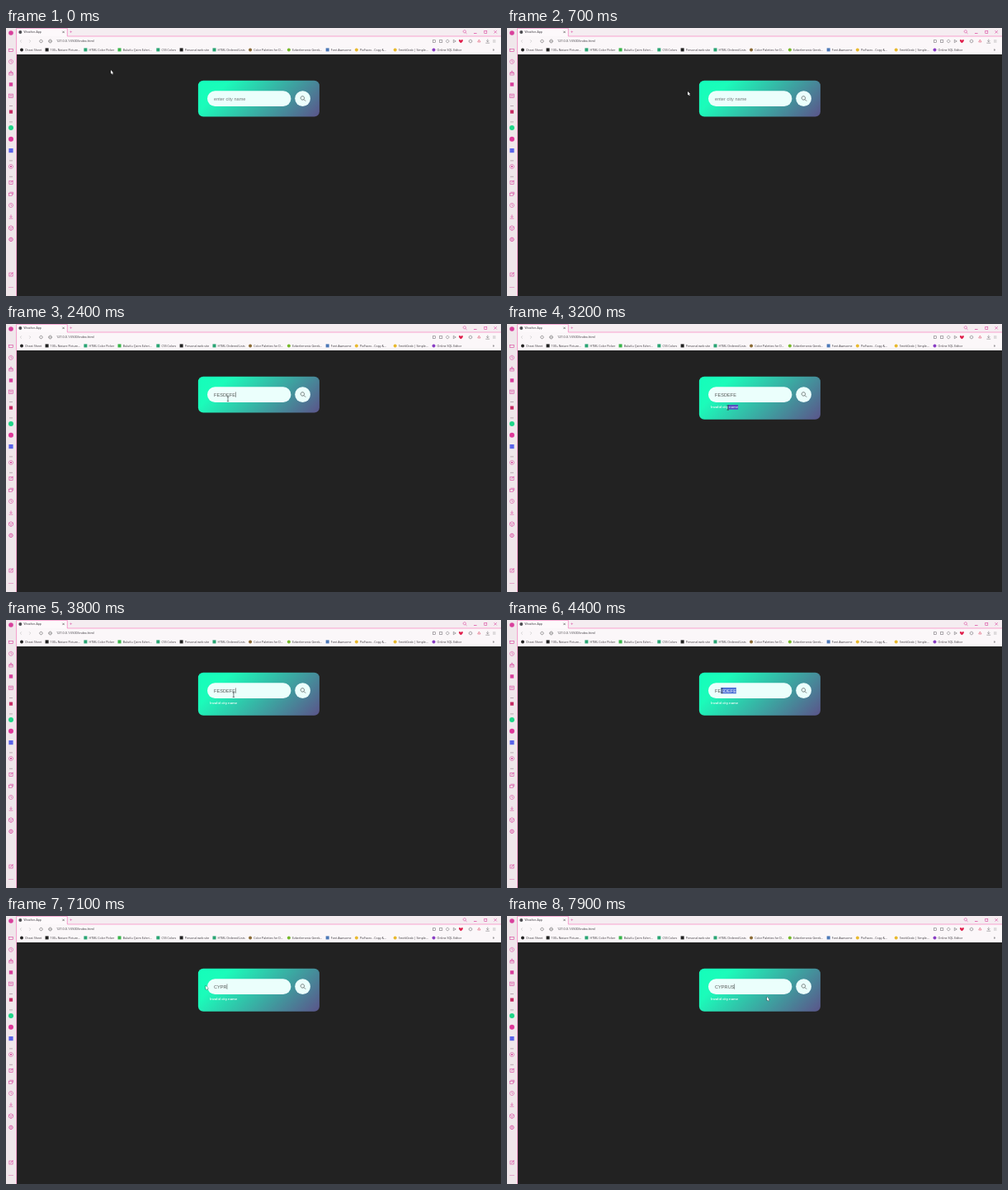
Animation of 600 by 325 pixels, one loop 8 s. Source, as an HTML page with a canvas:

```html
<!DOCTYPE html>
<html lang="en">
<head>
<meta charset="utf-8">
<title>Weather search</title>
<style>
html, body { margin: 0; width: 100%; height: 100%; overflow: hidden; background: #222; }
canvas { display: block; }
</style>
</head>
<body>
<canvas id="stage" width="600" height="325"></canvas>
<script>
const ctx = document.getElementById('stage').getContext('2d');
const LOOP = 8000, STEP = 100;
const PINK = '#d8409c', EDGE = '#f57fbe', INK = '#353238', GREY = '#77747a';
const UI = '"Open Sans", sans-serif', FIELD = '"Liberation Sans", Arial, sans-serif';

// ---- drawing helpers ----
function rect(x, y, w, h, color) {
  ctx.fillStyle = color;
  ctx.fillRect(x, y, w, h);
}
function round(x, y, w, h, r, fill) {
  ctx.beginPath();
  ctx.roundRect(x, y, w, h, r);
  ctx.fillStyle = fill;
  ctx.fill();
}
const square = (x, y, r, color) => rect(x - r, y - r, 2 * r, 2 * r, color);
const disc = (x, y, r, color) => round(x - r, y - r, 2 * r, 2 * r, r, color);

function line(color, width, ...pts) {
  ctx.beginPath();
  for (let i = 0; i < pts.length; i += 2) ctx.lineTo(pts[i], pts[i + 1]);
  ctx.strokeStyle = color;
  ctx.lineWidth = width;
  ctx.stroke();
}
// Regular outline; many sides make a ring.
function outline(x, y, r, sides, color, width = 0.6, turn = -Math.PI / 2) {
  const pts = [];
  for (let i = 0; i <= sides; i++) {
    const a = turn + i * 2 * Math.PI / sides;
    pts.push(x + r * Math.cos(a), y + r * Math.sin(a));
  }
  line(color, width, ...pts);
}
const ring = (x, y, r, color, width) => outline(x, y, r, 32, color, width);
function box(x, y, w, h, color, width = 0.6) {
  ctx.strokeStyle = color;
  ctx.lineWidth = width;
  ctx.strokeRect(x - w / 2, y - h / 2, w, h);
}
function cross(x, y, r, color) {
  line(color, 0.6, x - r, y - r, x + r, y + r);
  line(color, 0.6, x - r, y + r, x + r, y - r);
}
function lens(x, y, r, color, width) {
  ring(x, y, r, color, width);
  line(color, width, x + r * 0.7, y + r * 0.7, x + r * 1.7, y + r * 1.7);
}
function chevron(x, y, dir, color) {
  line(color, 0.6, x + dir * 0.8, y - 1.6, x - dir * 0.8, y, x + dir * 0.8, y + 1.6);
}
function download(x, y, color) {
  line(color, 0.6, x, y - 2.4, x, y + 0.8);
  line(color, 0.6, x - 1.5, y - 0.7, x, y + 0.8, x + 1.5, y - 0.7);
  line(color, 0.6, x - 2.4, y + 2.2, x + 2.4, y + 2.2);
}
// Small type is set ten times larger and scaled down for fractional advances.
function text(str, x, y, size, color, family = UI, weight = 400) {
  ctx.save();
  ctx.translate(x, y);
  ctx.scale(0.1, 0.1);
  ctx.font = `${weight} ${size * 10}px ${family}`;
  ctx.fillStyle = color;
  ctx.fillText(str, 0, 0);
  ctx.restore();
}
function textWidth(str, size, family = UI) {
  ctx.font = `${size * 10}px ${family}`;
  return ctx.measureText(str).width / 10;
}
function highlight(x, y, w, h, color, drawText) {
  if (w <= 0) return;
  ctx.save();
  ctx.beginPath();
  ctx.rect(x, y, w, h);
  ctx.clip();
  rect(x, y, w, h, color);
  drawText();
  ctx.restore();
}

// ---- browser frame ----
const bookmarks = [
  ['Cheat Sheet', '#222', disc],
  ['100+ Nature Picture...', '#222', square],
  ['HTML Color Picker', '#2aa574', square],
  ['Bulutlu Çizim Evleri...', '#39b54a', square],
  ['CSS Colors', '#2aa574', square],
  ['Personal web site', '#222', square],
  ['HTML Ordered Lists', '#2aa574', square],
  ['Color Palettes for D...', '#8a6a35', disc],
  ['Ezberlemeniz Gerek...', '#76b82a', disc],
  ['Font Awesome', '#4d79b8', square],
  ['PixFaces - Copy &...', '#e8b92e', disc],
  ['SmirkGrab | Simple...', '#e8b92e', disc],
  ['Online SQL Editor', '#8a3fc4', disc]
];

function drawBookmarks() {
  const size = 3.6, cutWidth = 36.4, gap = 10.4;
  let x = 19;
  for (const [label, color, shape] of bookmarks) {
    shape(x, 26.4, 2, color);
    text(label, x + 4.1, 27.7, size, INK);
    x += gap + (label.endsWith('...') ? cutWidth : textWidth(label, size));
  }
  text('»', 589.8, 27.8, 4.5, INK);
}

function heart(x, y, r, color) {
  ctx.beginPath();
  ctx.moveTo(x, y + r);
  for (const side of [-1, 1]) {
    ctx.bezierCurveTo(x + side * r * 2, y - r * 0.3, x + side * r * 0.7, y - r * 1.7, x, y - r * 0.4);
    ctx.lineTo(x, y + r);
  }
  ctx.fillStyle = color;
  ctx.fill();
}

const actions = [
  (x, y) => box(x, y, 3.2, 2.6, GREY),
  (x, y) => box(x, y, 3.4, 2.6, GREY),
  (x, y) => ring(x, y, 1.7, GREY),
  (x, y) => outline(x, y, 2, 3, GREY, 0.6, 0),
  (x, y) => heart(x, y, 2.3, '#e0224e')
];
const tools = [
  (x, y) => outline(x, y, 2, 6, GREY),
  (x, y) => outline(x, y, 1.9, 3, '#e0506a'),
  (x, y) => download(x, y, GREY)
];

function drawToolbar() {
  rect(0, 0, 600, 10, '#f5edf1');
  rect(13, 0, 61, 10.5, '#fdf9fb');
  rect(13, 10, 587, 22, '#fbf7f9');

  disc(17.3, 5, 2, '#4b4b50');
  text('Weather-App', 21.5, 6.3, 3.5, INK);
  cross(69.6, 4.9, 1.2, '#444');
  text('+', 77, 6.6, 6, PINK);

  lens(555.8, 4.2, 1.6, PINK, 0.6);
  line(PINK, 0.7, 567, 6.5, 570.6, 6.5);
  box(581.3, 4.8, 3, 3, PINK);
  cross(593.2, 4.8, 1.7, PINK);

  chevron(18, 16, 1, '#bbb');
  chevron(29, 16, -1, '#bbb');
  ring(42.5, 16, 1.7, '#555');
  ring(53.6, 16, 1.9, '#555');
  line('#555', 0.5, 51.7, 16, 55.5, 16);
  text('127.0.0.1:5500/index.html', 61, 17.4, 3.8, INK);
  actions.forEach((draw, i) => draw(519 + i * 8.1, 16));
  tools.forEach((draw, i) => draw(563 + i * 10.4, 16));
  for (let i = -1; i <= 1; i++) line('#999', 0.4, 590, 16 + i * 1.2, 593.5, 16 + i * 1.2);

  drawBookmarks();
}

const mark = (shape, color, r = 2.6) => (x, y) => shape(x, y, r, color);
const dial = (x, y) => {
  ring(x, y, 2.5, PINK);
  line(PINK, 0.6, x, y - 1.5, x, y, x + 1.2, y + 0.6);
};
const frame = (w, h) => (x, y) => box(x, y, w, h, PINK);
const nested = (x, y) => { box(x, y, 4.8, 4.2, PINK); ring(x, y, 1, PINK); };
const cube = (x, y) => {
  outline(x, y, 2.9, 6, PINK);
  for (let i = 0; i < 3; i++) {
    const a = Math.PI / 2 + i * Math.PI * 2 / 3;
    line(PINK, 0.5, x, y, x + 2.9 * Math.cos(a), y + 2.9 * Math.sin(a));
  }
};
const bag = (x, y) => { box(x, y + 0.9, 4.4, 3, PINK); outline(x, y - 0.8, 2, 3, PINK); };
const pen = (x, y) => { box(x, y, 4.2, 4, PINK); line(PINK, 0.7, x - 0.7, y + 0.7, x + 2.6, y - 2.6); };
const cards = (x, y) => {
  box(x - 0.6, y + 0.5, 4.2, 3, PINK);
  line(PINK, 0.6, x - 1.6, y - 2, x + 2.7, y - 2, x + 2.7, y + 1);
};
const gear = (x, y) => { outline(x, y, 2.3, 8, PINK, 0.8); ring(x, y, 0.8, PINK); };
const play = (x, y) => { ring(x, y, 2.5, PINK); square(x, y, 0.9, PINK); };

const sidebar = [
  [frame(5, 3.2), dial, bag, mark(square, PINK, 2.2), nested],
  [mark(square, '#c72c64', 2.1)],
  [mark(disc, '#20d68a', 3), mark(disc, '#e0389a', 3), mark(square, '#5b63ea')],
  [play],
  [pen, cards, dial, (x, y) => download(x, y, PINK), cube, gear]
];

function drawSidebar() {
  const x = 6, pitch = 13.8, groupGap = 5.6;
  rect(0, 0, 13, 325, '#f0e7eb');
  disc(x, 6, 2.8, PINK);
  let y = 27;
  sidebar.forEach((group, i) => {
    if (i) {
      line('#a58f9b', 0.7, x - 2, y - pitch / 2 + 2.6 - groupGap / 2, x + 2, y - pitch / 2 + 2.6 - groupGap / 2);
      y += 0;
    }
    for (const draw of group) {
      draw(x, y);
      y += pitch;
    }
    y += groupGap;
  });
  pen(x, 299);
  for (let i = -1; i <= 1; i++) disc(x + i * 2, 314.5, 0.5, PINK);
  line(EDGE, 0.7, 12.6, 325, 12.6, 0.4, 74.3, 0.4, 74.3, 10, 600, 10);
}

// ---- timeline ----
const START = { x: 127, y: 51 };
const moves = [
  { from: 100, to: 1100, x: 269, y: 91 },
  { from: 2500, to: 2900, x: 281, y: 101.5 },
  { from: 2900, to: 3250, x: 267, y: 101.5 },
  { from: 3600, to: 3900, x: 279, y: 87 },
  { from: 4000, to: 4800, x: 242, y: 84.5 },
  { from: 7100, to: 7800, x: 315, y: 98 }
];
const words = [
  { value: 'FESDEFE', at: 1700, every: 100 },
  { value: 'CYPRUS', at: 5200, every: 520 }
];
const FOCUS = 1200, ERROR_AT = 2600, SELECT_ERROR = 2900, REFOCUS = 3700, SELECT_FIELD = 4000;

function pointerAt(t) {
  let { x, y } = START;
  for (const m of moves) {
    const k = Math.min(1, Math.max(0, (t - m.from) / (m.to - m.from)));
    const ease = k * k * (3 - 2 * k);
    x += (m.x - x) * ease;
    y += (m.y - y) * ease;
  }
  return { x, y };
}
function typing(t) {
  const { value, at, every } = words[t < words[1].at ? 0 : 1];
  const count = Math.min(value.length, Math.max(0, Math.floor((t - at) / every) + 1));
  return { value: value.slice(0, count), lastKey: count ? at + (count - 1) * every : 0 };
}
const errorSelected = t => t >= SELECT_ERROR && t < REFOCUS;
const fieldSelected = t => t >= SELECT_FIELD && t < words[1].at;

// ---- page ----
function drawField(t, mx) {
  const x = 252, base = 87.8, size = 5.625;
  const { value, lastKey } = typing(t);
  const write = color => text(value || 'enter city name', x, base, size, color, FIELD);
  write(value ? '#555' : '#757b7b');

  const edge = n => x + textWidth(value.slice(0, n), size, FIELD);
  const end = edge(value.length);
  if (fieldSelected(t)) {
    let n = 0;
    while (n < value.length && edge(n + 1) <= mx + 0.8) n++;
    highlight(edge(n), 81.7, end - edge(n), 7.8, '#4f72d6', () => write('#eef3ff'));
  } else if (t >= FOCUS && !errorSelected(t)) {
    const since = t - Math.max(FOCUS, lastKey, t >= REFOCUS ? REFOCUS : 0);
    if (since % 1000 < 500) rect(end + 0.1, 82.4, 0.5, 6.4, '#333');
  }
}

function drawError(t, mx) {
  const right = 280.3;
  const write = color => text('Invalid city name', 247, 102.1, 4.05, color, UI, 600);
  write('#fff');
  if (errorSelected(t)) highlight(mx, 98, right - mx, 5.8, '#5550c0', () => write('#dcd8ff'));
}

function drawCard(t, mx) {
  const x = 232.9, y = 63.75, w = 147, h = t >= ERROR_AT ? 52 : 43.75;
  const cx = x + w / 2, cy = y + h / 2, d = (w + h) / 4;
  const fill = ctx.createLinearGradient(cx - d, cy - d, cx + d, cy + d);
  fill.addColorStop(0, '#14feba');
  fill.addColorStop(0.2, '#1bfcba');
  fill.addColorStop(1, '#5b548a');
  round(x, y, w, h, 6.25, fill);
  round(244, 76.25, 101.4, 18.75, 9.4, '#ebfffc');
  disc(359.6, 85.6, 9.4, '#ebfffc');
  lens(359.4, 84.9, 2.2, '#444', 0.7);
  drawField(t, mx);
  if (t >= ERROR_AT) drawError(t, mx);
}

function drawPointer({ x, y }) {
  const overField = x > 244 && x < 345 && y > 76 && y < 95;
  const overError = x > 247 && x < 282 && y > 98 && y < 104;
  if (overField || overError) {
    line('#2a2a30', 0.6, x, y - 2.7, x, y + 2.7);
    for (const end of [-2.7, 2.7]) line('#2a2a30', 0.6, x - 1.2, y + end, x + 1.2, y + end);
    return;
  }
  const arrow = new Path2D('M0 0V4.6L1.1 3.7 1.9 5.4 2.7 5 1.9 3.4H3.3Z');
  ctx.save();
  ctx.translate(x, y);
  ctx.lineWidth = 0.5;
  ctx.strokeStyle = '#111';
  ctx.stroke(arrow);
  ctx.fillStyle = '#fff';
  ctx.fill(arrow);
  ctx.restore();
}

function render(now) {
  const t = Math.floor((now % LOOP) / STEP) * STEP;
  const pointer = pointerAt(t);
  rect(0, 0, 600, 325, '#222');
  drawToolbar();
  drawSidebar();
  drawCard(t, pointer.x);
  drawPointer(pointer);
}

const began = performance.now();
function tick() {
  render(performance.now() - began);
  requestAnimationFrame(tick);
}
tick();
</script>
</body>
</html>
```
